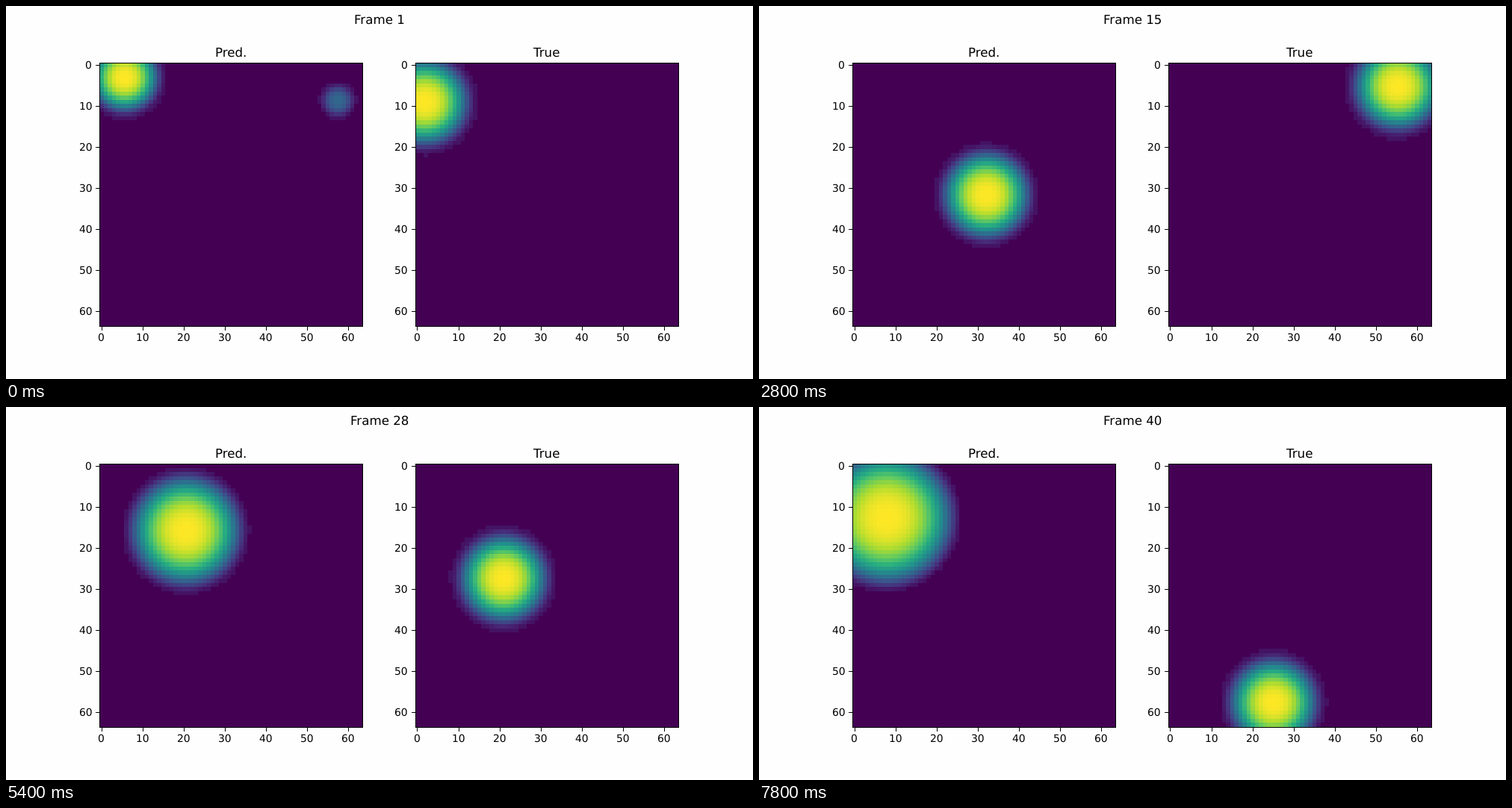
An HTML page with a canvas that plays this animation: 1000x500 px, repeating every 8000 ms.

```html
<!DOCTYPE html>
<html lang="en">
<head>
<meta charset="utf-8">
<title>Predicted and true motion</title>
<style>
html, body { margin: 0; width: 100%; height: 100%; overflow: hidden; background: #fefefe; }
canvas { display: block; }
</style>
</head>
<body>
<canvas id="stage" width="1000" height="500"></canvas>
<script>
const ctx = document.getElementById('stage').getContext('2d');
const STEP = 200, COUNT = 40, GRID = 64;
const SIDE = 352.27, CELL = SIDE / GRID, TOP = 76.36;
const LEFT_PRED = 125, LEFT_TRUE = 547.73;

const VIRIDIS = '440154 472d7b 3b528b 2c728e 21918c 28ae80 5ec962 addc30 fde725'.split(' ')
  .map(hex => [0, 2, 4].map(i => parseInt(hex.slice(i, i + 2), 16)));

// Turning points of the predicted path: [step, position].
const TURNS_X = [[4, 57.5], [24, 13.5], [31, 25], [44, 3]];
const TURNS_Y = [[1, 8.7], [16.5, 32.2], [26.5, 15], [33.5, 21.8], [41, 12.2]];

const lerp = (a, b, u) => a + (b - a) * u;
const clamp01 = u => Math.min(Math.max(u, 0), 1);

function viridis(v) {
  const p = clamp01(v) * (VIRIDIS.length - 1);
  const i = Math.min(Math.floor(p), VIRIDIS.length - 2);
  const rgb = VIRIDIS[i].map((c, k) => Math.round(lerp(c, VIRIDIS[i + 1][k], p - i)));
  return `rgb(${rgb})`;
}

// Cosine easing from one turning point to the next.
function swing(turns, n) {
  const next = Math.max(1, turns.findIndex(([step]) => step >= n));
  const [start, from] = turns[next - 1], [end, to] = turns[next];
  const u = clamp01((n - start) / (end - start));
  return lerp(from, to, (1 - Math.cos(Math.PI * u)) / 2);
}

// Round hump that reaches zero at the given radius; a lower falloff gives a steeper rim.
function blob(x, y, radius, falloff, amp = 1) {
  return (col, row) => {
    const r = Math.hypot(col - x, row - y) / radius;
    return r < 1 ? amp * Math.pow(1 - Math.pow(r, 2.7), falloff) : 0;
  };
}

// Reflect a straight path between the walls at 0 and 63.
function bounce(p) {
  const wall = GRID - 1, m = p % (2 * wall);
  return m > wall ? 2 * wall - m : m;
}

function trueBlobs(n) {
  return [blob(bounce(1.72 + 3.828 * (n - 1)), bounce(9 + 7.985 * (n - 1)), 14, 2.4)];
}

// The first blob fades in the corner while the moving one grows.
function predBlobs(n) {
  const radius = (10.5 + 0.2 * n) * Math.min(1, n / 2);
  return [
    blob(5.6, 3.1, 11.2, 2.6, Math.pow(0.33, n - 1)),
    blob(swing(TURNS_X, n), swing(TURNS_Y, n), radius, 2.6 - 0.03 * n, Math.min(1, n / 3))
  ];
}

// align: 0 left, 0.5 centre, 1 right
function text(str, x, y, size, align = 0.5) {
  ctx.font = `${size}px "DejaVu Sans", sans-serif`;
  ctx.textRendering = 'geometricPrecision';
  ctx.fillText(str, Math.round(x - ctx.measureText(str).width * align), y);
}

function drawField(left, blobs) {
  const x0 = Math.round(left), y0 = Math.round(TOP);
  const edgeX = col => Math.round(x0 + col * CELL);
  const edgeY = row => Math.round(TOP + row * CELL);
  ctx.fillStyle = viridis(0);
  ctx.fillRect(x0, y0, edgeX(GRID) - x0, edgeY(GRID) - y0);

  const values = [];
  for (let row = 0; row < GRID; row++)
    for (let col = 0; col < GRID; col++)
      values.push(blobs.reduce((sum, f) => sum + f(col, row), 0));
  const peak = Math.max(...values);

  values.forEach((raw, i) => {
    const v = raw / peak;
    if (v < 0.016) return;
    const col = i % GRID, row = Math.floor(i / GRID);
    const x = edgeX(col), y = edgeY(row);
    ctx.fillStyle = viridis(Math.max(v, 0.05));
    ctx.fillRect(x, y, edgeX(col + 1) - x, edgeY(row + 1) - y);
  });
}

function drawAxes(left, title) {
  const x0 = Math.round(left), y0 = Math.round(TOP);
  const x1 = Math.round(left + SIDE), y1 = Math.round(TOP + SIDE);
  ctx.strokeStyle = ctx.fillStyle = '#000';
  ctx.lineWidth = 1;
  ctx.strokeRect(x0 + 0.5, y0 + 0.5, x1 - x0, y1 - y0);
  for (let v = 0; v <= 60; v += 10) {
    const offset = (v + 0.5) * CELL;
    const x = Math.round(left + offset), y = Math.round(TOP + offset);
    ctx.fillRect(x, y1 + 1, 1, 5);
    ctx.fillRect(x0 - 5, y, 5, 1);
    text(v, left + offset, 449, 13.89);
    text(v, left - 9.7, y + 5, 13.89, 1);
  }
  text(title, left + SIDE / 2, 68, 16.67);
}

let shown = 0;
function draw() {
  const n = Math.floor(performance.now() / STEP) % COUNT + 1;
  if (n !== shown) {
    shown = n;
    ctx.fillStyle = '#fefefe';
    ctx.fillRect(0, 0, 1000, 500);
    drawField(LEFT_PRED, predBlobs(n));
    drawField(LEFT_TRUE, trueBlobs(n));
    drawAxes(LEFT_PRED, 'Pred.');
    drawAxes(LEFT_TRUE, 'True');
    text('Frame ' + n, 500, 24, 16.67);
  }
  requestAnimationFrame(draw);
}
draw();
</script>
</body>
</html>
```
